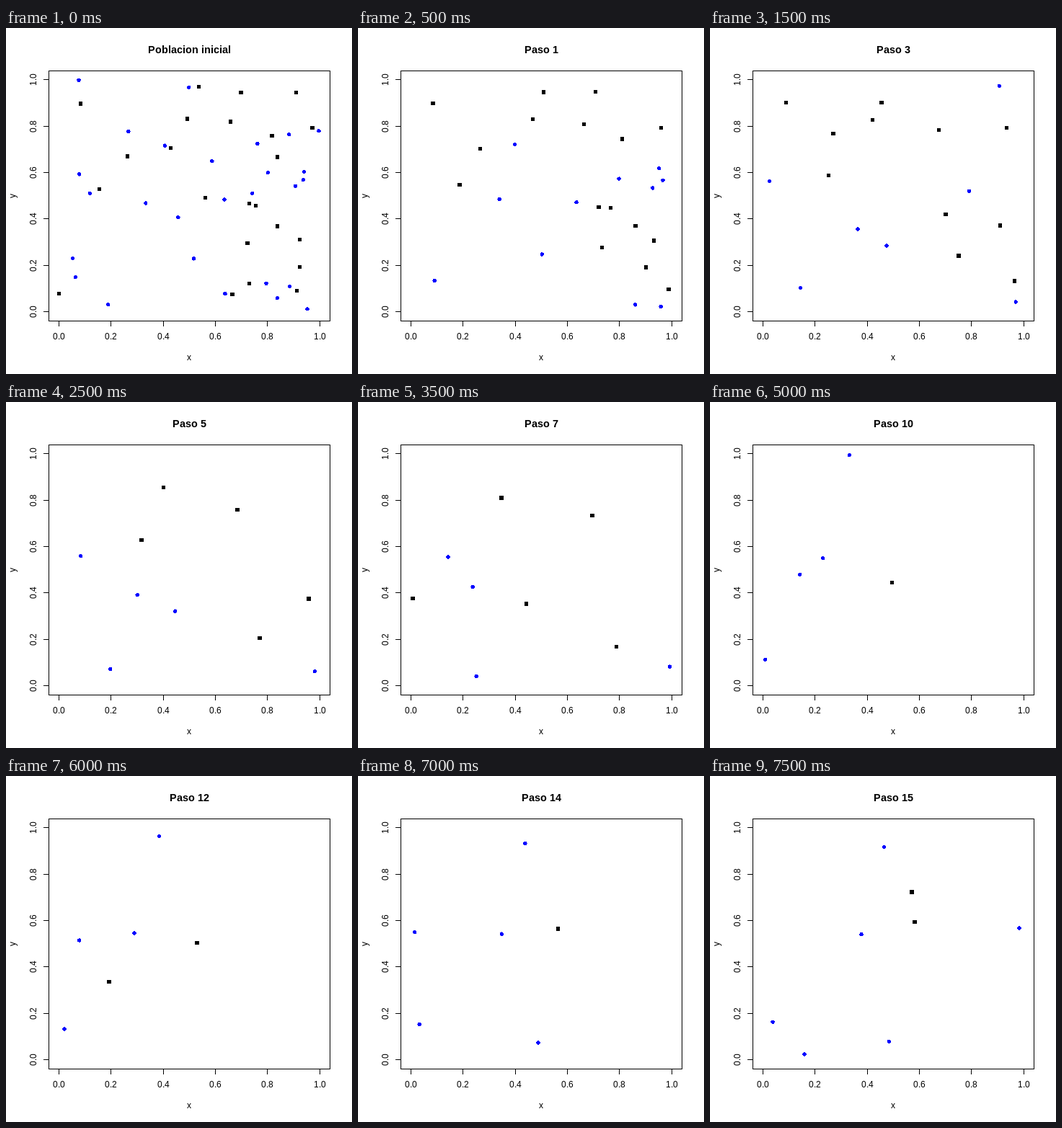
Animation of 480 by 480 pixels, one loop 8 s. Source, as an HTML page with a canvas:

```html
<!DOCTYPE html>
<html lang="es">
<head>
<meta charset="utf-8">
<style>
html, body { margin: 0; width: 100%; height: 100%; overflow: hidden; background: #fff; }
canvas { display: block; }
</style>
</head>
<body>
<canvas id="plot" width="480" height="480"></canvas>
<script>
const ctx = document.getElementById("plot").getContext("2d");
const STEP_MS = 500, STEPS = 16, R = 2.7;
const LEFT = 73.5, WIDTH = 361.8, TOP = 71.9, HEIGHT = 321.8;
const FONT = '"Liberation Sans", Arial, sans-serif';

let seed = 7;
const random = () => (seed = (seed * 16807) % 2147483647) / 2147483647;

// A crowd of n random walkers; each step only the share `keep` survives
function crowd(n, keep) {
  return Array.from({ length: n }, (_, i) => ({
    x: LEFT + random() * WIDTH, y: TOP + random() * HEIGHT,
    vx: (random() - 0.5) * 20, vy: (random() - 0.5) * 20,
    birth: 0, end: Math.floor(Math.log((i + 1) / n) / Math.log(keep)) + 1
  }));
}

const walker = (x, y, vx, vy, end = STEPS, birth = 0) => ({ x, y, vx, vy, end, birth });

// Long-lived walkers: start, velocity per step, step of death, step of birth
const squares = [
  walker(103.5, 105, .7, -.6, 5),
  walker(267.5, 81.7, -9.8, 7.3, 8),
  walker(251.3, 125.9, -8.7, .5, 4),
  walker(311.3, 129.8, 1.97, 3.95, 10),
  walker(335, 298.4, 3.37, 5.88, 10),
  walker(425, 138.2, -4.6, 0, 4),
  walker(168.3, 178, .9, -10.6, 5),
  walker(129.3, 223.7, 11.75, -6.5, 7),
  walker(376.4, 275, 8.75, -.4, 8),
  walker(233.4, 279.8, 6.3, -9.7, 16, 7),
  walker(143, 285.5, 0, 0, 14, 11),
  walker(280, 161, 0, 0, 16, 15),
  ...crowd(14, 0.55)
];
const circles = [
  walker(363.4, 200.6, -1.3, 8.55, 4),
  walker(412.3, 210.7, 10.63, .6),
  walker(96.4, 345.7, 9.68, 4.97),
  walker(260.4, 319.9, -5.15, -5.95, 7),
  walker(376.4, 374.8, 8.3, 9.1, 4),
  walker(418, 389.8, 2.06, -3.24),
  walker(216.6, 284.7, -11.5, -5.67, 16, 2),
  walker(250, 370, -1.7, -1.8, 16, 14),
  walker(131, 386, 0, 0, 16, 15),
  ...crowd(21, 0.25)
];

// The plot area is a torus
const wrap = (v, start, size) => start + (((v - start) % size) + size) % size;

function place(list, step, paint) {
  for (const p of list) {
    if (step < p.birth || step >= p.end) continue;
    const age = step - p.birth;
    paint(wrap(p.x + p.vx * age, LEFT, WIDTH), wrap(p.y + p.vy * age, TOP, HEIGHT));
  }
}

function square(x, y) {
  const x0 = Math.round(x - R), y0 = Math.round(y - R);
  ctx.fillRect(x0, y0, Math.round(x + R) - x0, Math.round(y + R) - y0);
}

// Disc without antialiasing, one pixel row at a time
function circle(x, y) {
  for (let row = Math.round(y - R); row + 0.5 < y + R; row++) {
    const half = Math.sqrt(Math.max(0, R * R - (row + 0.5 - y) ** 2));
    const x0 = Math.round(x - half);
    ctx.fillRect(x0, row, Math.round(x + half) - x0, 1);
  }
}

// Centred text with whole-pixel glyph advances
function text(str, x, y, turned) {
  const widths = [...str].map(c => Math.round(ctx.measureText(c).width));
  const total = widths.reduce((a, b) => a + b, 0);
  ctx.save();
  ctx.translate(Math.round(x), Math.round(y));
  if (turned) ctx.rotate(-Math.PI / 2);
  const shift = turned ? Math.round(y) - y : x - Math.round(x);
  let pen = Math.round(shift - total / 2);
  [...str].forEach((c, i) => {
    ctx.fillText(c, pen, 0);
    pen += widths[i];
  });
  ctx.restore();
}

function axes() {
  ctx.lineWidth = 1;
  ctx.strokeStyle = "#000";
  ctx.strokeRect(59.5, 59.5, 390, 347);
  ctx.font = "12px " + FONT;
  for (let i = 0; i <= 5; i++) {
    const x = LEFT + WIDTH * i / 5, y = TOP + HEIGHT * (1 - i / 5);
    const label = (i / 5).toFixed(1);
    ctx.fillRect(Math.floor(x), 407, 1, 7);
    ctx.fillRect(52, Math.floor(y), 7, 1);
    text(label, x, 432);
    text(label, 42, y, true);
  }
  text("x", 254.4, 461);
  text("y", 13, 232.8, true);
}

function draw(now) {
  const step = Math.floor(now / STEP_MS) % STEPS;
  ctx.fillStyle = "#fff";
  ctx.fillRect(0, 0, 480, 480);
  ctx.fillStyle = "#000";
  axes();
  ctx.font = "bold 14.4px " + FONT;
  text(step ? "Paso " + step : "Poblacion inicial", 254.4, 35);
  place(squares, step, square);
  ctx.fillStyle = "#00f";
  place(circles, step, circle);
}

const start = performance.now();
function tick() {
  draw(performance.now() - start);
  requestAnimationFrame(tick);
}
tick();
</script>
</body>
</html>
```
